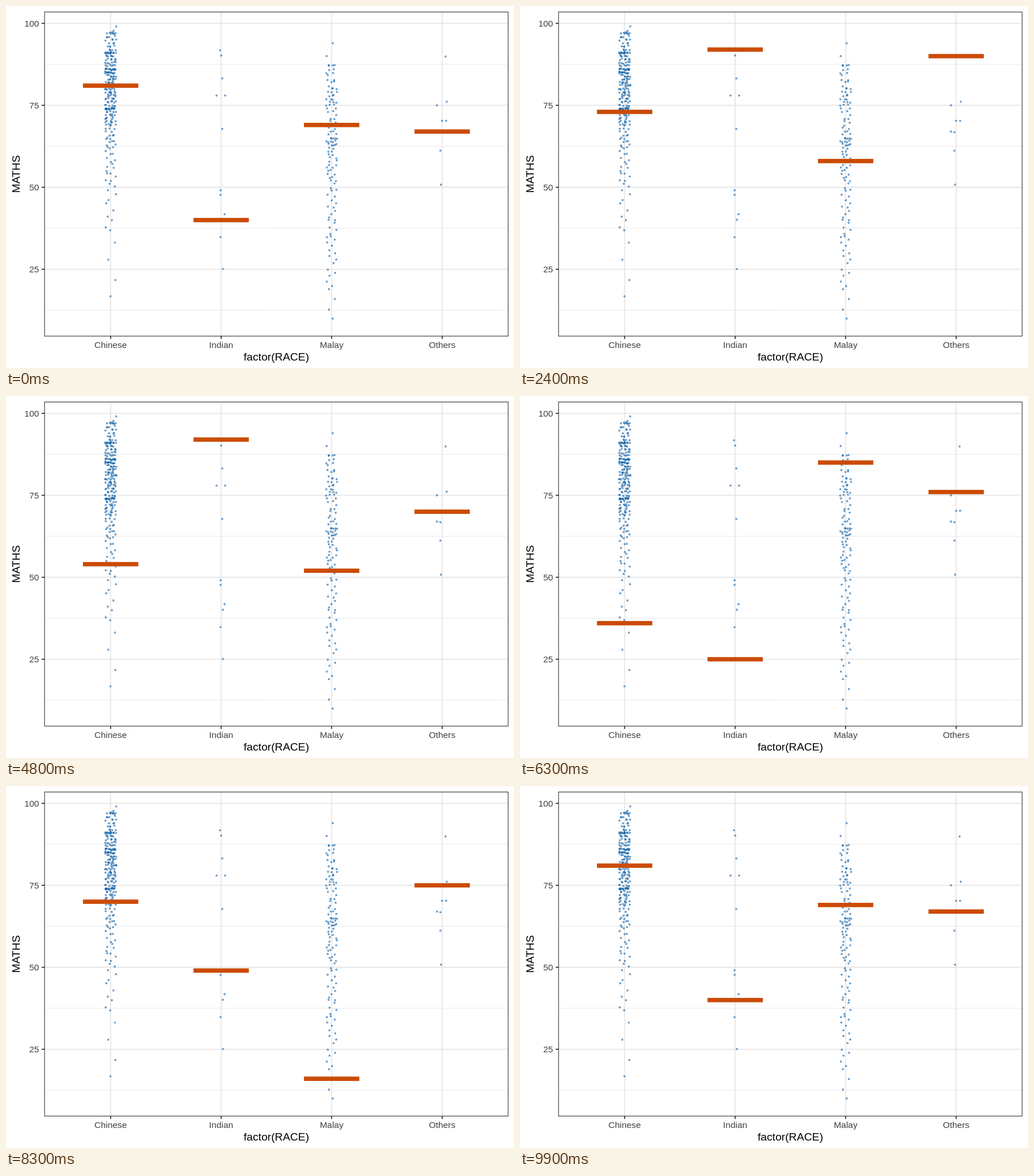
These frames come from a looping animation (885 px wide and 632 px high, 10000 ms). An HTML page with a canvas:

```html
<!DOCTYPE html>
<html lang="en">
<head>
<meta charset="utf-8">
<title>Maths scores by group</title>
<style>
html, body { margin: 0; width: 100%; height: 100%; overflow: hidden; background: #fff; }
canvas { display: block; width: 885px; height: 632px; }
</style>
</head>
<body>
<canvas id="stage" width="885" height="632"></canvas>
<script>
const W = 885, H = 632, LOOP = 10000;
const FONT = '"Liberation Sans", Arial, sans-serif';
const BOX = { left: 67.2, top: 10.5, right: 874.8, bottom: 576.3 };
const BLUE = 'rgba(8, 94, 166, 0.6)', ORANGE = '#cb4b05', GRID = '#e6e6e6';
const labels = ['Chinese', 'Indian', 'Malay', 'Others'];

const xOf = i => 182.3 + i * 192.5;
const yOf = v => 30.3 + (100 - v) * 5.724;

// Sampled score per group, one row per draw
const draws = [
  [81, 40, 69, 67], [74, 90, 9, 75], [85, 25, 64, 75], [78, 90, 57, 67], [71, 40, 52, 70],
  [77, 78, 52, 70], [73, 92, 58, 90], [80, 90, 63, 67], [79, 49, 70, 76], [85, 25, 62, 70],
  [86, 25, 52, 70], [78, 68, 65, 67], [54, 92, 52, 70], [79, 42, 66, 75], [72, 90, 75, 67],
  [83, 92, 35, 61], [36, 25, 85, 76], [60, 49, 43, 67], [65, 25, 54, 70], [72, 83, 62, 70],
  [74, 68, 36, 70], [70, 49, 16, 75], [86, 35, 65, 67], [86, 68, 59, 90], [76, 78, 54, 70]
];

// Small groups: horizontal offset in px, score
const indian = [[-2, 91.8], [0, 90.2], [2, 83.2], [-8, 78], [7, 78], [2, 67.8],
  [-1, 49.1], [-1, 47.7], [6, 41.8], [3, 40.1], [-1, 34.8], [3, 25.1]];
const others = [[6, 89.9], [8, 76.1], [-9, 75], [0, 70.3], [7, 70.3],
  [-9, 67], [-3, 66.8], [-3, 61.2], [-2, 50.8]];

// Large groups: score by rank, straight between knots
const chinese = [[0, 99.4], [2, 97.4], [10, 96.6], [28, 91.6], [43, 90.5], [67, 86.5], [94, 84.5],
  [144, 77.5], [163, 74.4], [178, 73.5], [205, 68.5], [224, 61.5], [241, 50], [250, 36], [254, 14]];
const malay = [[0, 96], [2, 87.4], [6, 86.6], [16, 80.6], [34, 74.6], [49, 65.6],
  [65, 62.5], [87, 51.5], [113, 30], [122, 18], [125, 8]];

let seed = 7;
function rand() {
  seed = (Math.imul(seed, 1664525) + 1013904223) >>> 0;
  return seed / 4294967296;
}

const points = [];

function addPoints(group, list) {
  for (const [dx, v] of list) points.push([xOf(group) + dx, yOf(v)]);
}

function addRanked(group, knots) {
  const total = knots[knots.length - 1][0];
  let k = 0, u = rand();
  for (let i = 0; i < total; i++) {
    if (i >= knots[k + 1][0]) k++;
    const [n0, v0] = knots[k], [n1, v1] = knots[k + 1];
    const score = Math.round(v0 + (v1 - v0) * (i + 0.5 - n0) / (n1 - n0));
    u = (u + 0.3 + 0.5 * rand()) % 1;
    points.push([xOf(group) + (u - 0.5) * 19.5, yOf(score + (rand() - 0.5) * 0.6)]);
  }
}

addRanked(0, chinese);
addPoints(1, indian);
addRanked(2, malay);
addPoints(3, others);

function line(c, x1, y1, x2, y2, color, width) {
  c.strokeStyle = color;
  c.lineWidth = width;
  c.beginPath();
  c.moveTo(x1, y1);
  c.lineTo(x2, y2);
  c.stroke();
}

function text(c, str, x, y, size, color, align) {
  c.font = size + 'px ' + FONT;
  c.fillStyle = color;
  c.textAlign = align;
  c.fillText(str, x, y);
}

function drawChart(c) {
  const { left, top, right, bottom } = BOX;
  c.fillStyle = '#fff';
  c.fillRect(0, 0, W, H);

  for (let v = 12.5; v < 100; v += 25) line(c, left, yOf(v), right, yOf(v), GRID, 0.9);
  for (let v = 25; v <= 100; v += 25) {
    const y = yOf(v);
    line(c, left, y, right, y, GRID, 1.8);
    line(c, left - 5, y, left, y, '#222', 1.7);
    text(c, v, 57.6, y + 5.6, 15.4, '#404040', 'right');
  }
  labels.forEach((name, i) => {
    const x = xOf(i);
    line(c, x, top, x, bottom, GRID, 1.8);
    line(c, x, bottom, x, bottom + 5, '#222', 1.7);
    text(c, name, x, 596.6, 15.4, '#404040', 'center');
  });

  c.fillStyle = BLUE;
  for (const [x, y] of points) {
    c.beginPath();
    c.arc(x, y, 1.85, 0, Math.PI * 2);
    c.fill();
  }

  c.strokeStyle = '#333';
  c.lineWidth = 1.1;
  c.strokeRect(left, top, right - left, bottom - top);

  text(c, 'factor(RACE)', 471, 618.8, 19.2, '#000', 'center');
  c.save();
  c.translate(23.5, 293.4);
  c.rotate(-Math.PI / 2);
  text(c, 'MATHS', 0, 0, 19.2, '#000', 'center');
  c.restore();
}

// Draws last 400 ms, except one that is 100 ms shorter
const startOf = k => 400 * k - (k > 12 ? 100 : 0);

function scoresAt(t) {
  let k = 0;
  while (k < draws.length && t >= startOf(k + 1)) k++;
  const now = draws[k % draws.length];
  const next = draws[(k + 1) % draws.length];
  const halfway = k < draws.length && t >= startOf(k + 1) - 100;
  return halfway ? now.map((v, i) => (v + next[i]) / 2) : now;
}

const chart = document.createElement('canvas');
chart.width = W;
chart.height = H;
drawChart(chart.getContext('2d'));

const ctx = document.getElementById('stage').getContext('2d');
const began = performance.now();

function frame() {
  const t = (performance.now() - began) % LOOP;
  ctx.drawImage(chart, 0, 0);
  ctx.fillStyle = ORANGE;
  scoresAt(t).forEach((v, i) => ctx.fillRect(xOf(i) - 48.2, yOf(v) - 3.8, 96.4, 7.6));
  requestAnimationFrame(frame);
}
frame();
</script>
</body>
</html>
```
